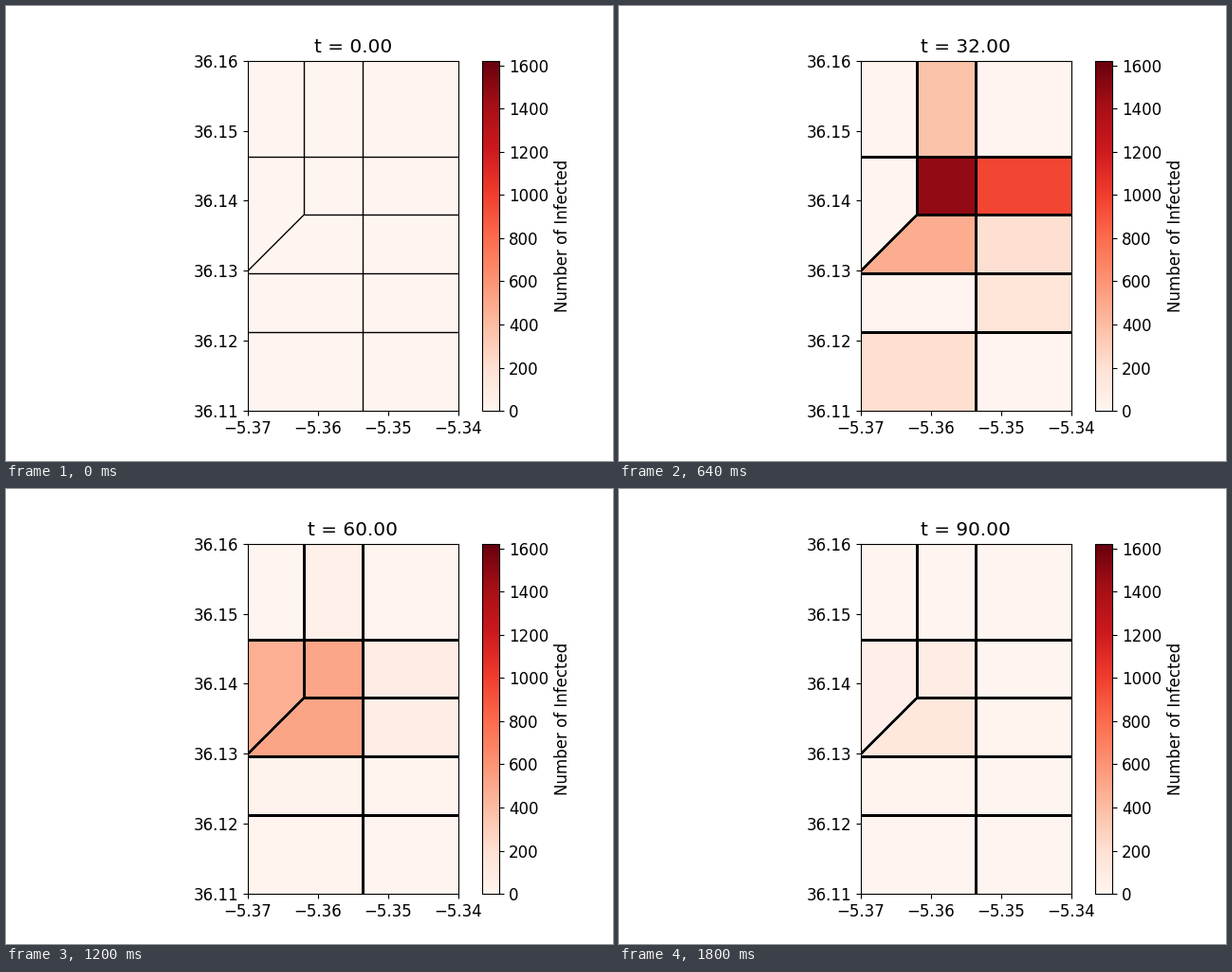
Write a matplotlib script that moves like this. It is 640 by 480 pixels and loops after 1820 ms.

```python
import numpy as np
import matplotlib.pyplot as plt
from matplotlib.animation import FuncAnimation
from matplotlib.cm import ScalarMappable
from matplotlib.collections import LineCollection, PolyCollection
from matplotlib.colors import Normalize

FRAMES, INTERVAL = 91, 20
PEAK = 1622

plt.rcParams.update({"font.family": "DejaVu Sans", "font.size": 12})

# Cell borders in degrees
W, X1, X2, E = -5.37, -5.362, -5.3536, -5.34
S, Y1, Y2, Y3, Y4, N = 36.11, 36.1213, 36.1296, 36.138, 36.1463, 36.16
CORNER = 36.13


def rect(x0, x1, y0, y1):
    return [(x0, y0), (x1, y0), (x1, y1), (x0, y1)]


# Each cell: outline, then peak, time of peak, growth rate, decay rate
CELLS = [
    (rect(W, X1, Y4, N), (8, 40, .1, .05)),
    (rect(X1, X2, Y4, N), (465, 24, .13, .075)),
    (rect(X2, E, Y4, N), (8, 40, .1, .05)),
    ([(W, CORNER), (X1, Y3), (X1, Y4), (W, Y4)], (680, 52, .35, .068)),
    (rect(X1, X2, Y3, Y4), (PEAK, 36, .17, .06)),
    (rect(X2, E, Y3, Y4), (1290, 25, .17, .09)),
    ([(W, Y2), (X2, Y2), (X2, Y3), (X1, Y3), (W, CORNER)],
     (830, 44, .14, .045)),
    (rect(X2, E, Y2, Y3), (220, 35, .2, .055)),
    (rect(W, X2, Y1, Y2), (22, 55, .08, .02)),
    (rect(X2, E, Y1, Y2), (310, 19, .15, .08)),
    (rect(W, X2, S, Y1), (430, 22, .3, .1)),
    (rect(X2, E, S, Y1), (8, 40, .1, .05)),
]
EDGES = [
    [(X1, Y3), (X1, N)],
    [(X2, S), (X2, N)],
    [(W, Y1), (E, Y1)],
    [(W, Y2), (E, Y2)],
    [(X1, Y3), (E, Y3)],
    [(W, Y4), (E, Y4)],
    [(W, CORNER), (X1, Y3)],
]

outlines, params = zip(*CELLS)
peak, t_peak, grow, decay = np.array(params).T


def infected(t):
    """Exponential growth turning into exponential decay at the peak."""
    x = t - t_peak
    wave = (grow + decay) / (decay * np.exp(-grow * x) + grow * np.exp(decay * x))
    return peak * wave * (1 - np.exp(-t / 3))


fig, ax = plt.subplots(figsize=(6.4, 4.8), dpi=100)
mapper = ScalarMappable(Normalize(0, PEAK), "Reds")
fig.colorbar(mapper, ax=ax, label="Number of Infected")

ax.set_aspect("equal")
ax.set_xlim(W, E)
ax.set_ylim(S, N)
ax.set_xticks([-5.37, -5.36, -5.35, -5.34])
ax.set_yticks([36.11, 36.12, 36.13, 36.14, 36.15, 36.16])
ax.xaxis.set_major_formatter(lambda v, _: f"{v:.2f}".replace("-", "\u2212"))
ax.yaxis.set_major_formatter("{x:.2f}")

cells = ax.add_collection(PolyCollection(outlines, zorder=1), autolim=False)
borders = ax.add_collection(
    LineCollection(EDGES, colors="k", linewidths=1, zorder=2), autolim=False)
title = ax.set_title("t = 0.00")


def update(t):
    colors = mapper.to_rgba(infected(t))
    cells.set_facecolor(colors)
    cells.set_edgecolor(colors)
    # Borders are drawn anew on top of the old ones, so soft edges darken
    borders.set_segments(EDGES * (t + 1))
    title.set_text(f"t = {t:.2f}")
    return cells, borders, title


anim = FuncAnimation(fig, update, frames=FRAMES, interval=INTERVAL,
                     repeat=True, repeat_delay=0)
plt.show()
```
